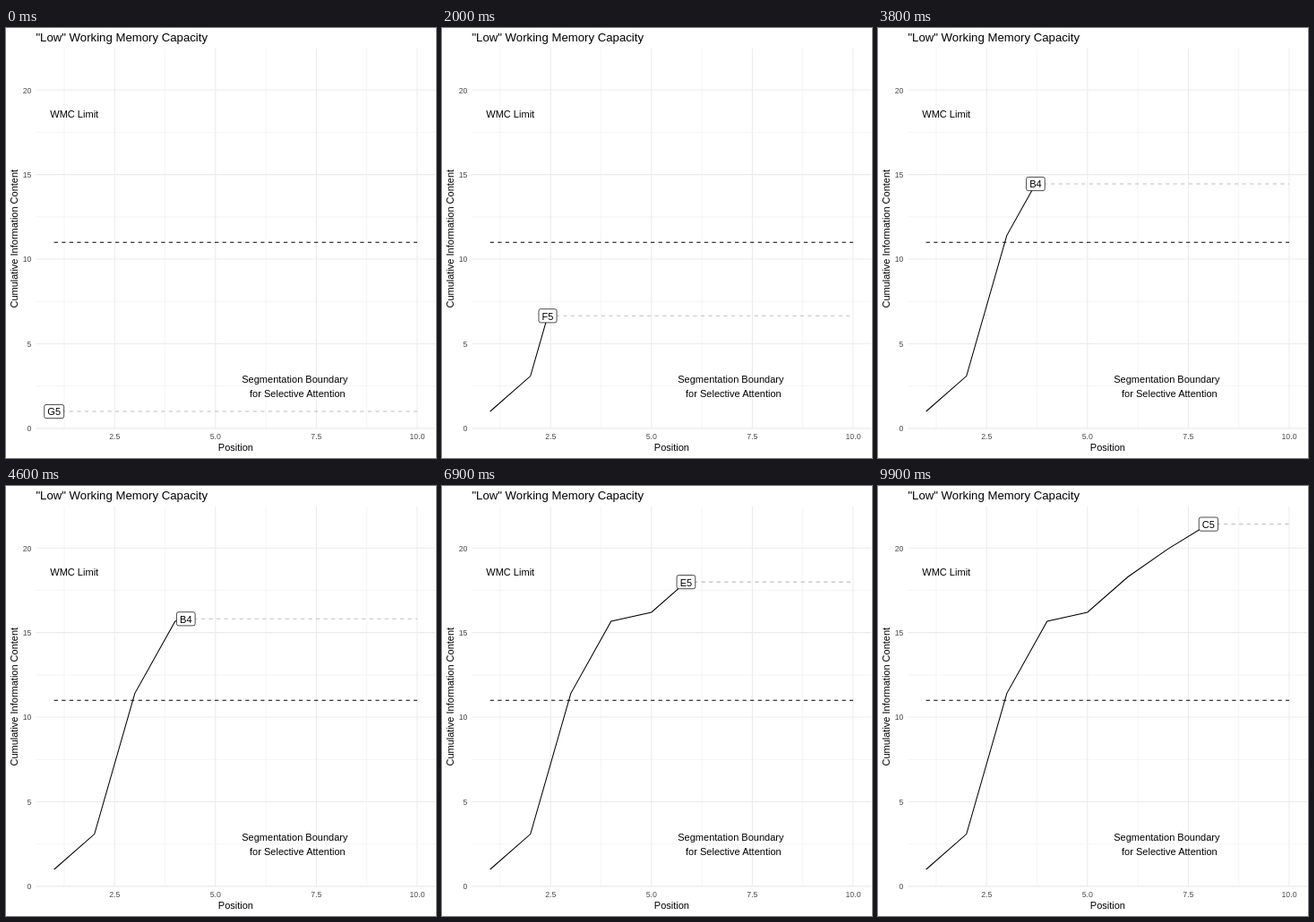
Animation, 480 px wide and 480 px high, one loop 10 s. Source, as an HTML page:

```html
<!DOCTYPE html>
<html lang="en">
<head>
<meta charset="utf-8">
<title>Working memory chart</title>
<style>
  html, body { margin: 0; width: 100%; height: 100%; overflow: hidden; background: #fff; }
  svg { display: block; width: 480px; height: 480px; font: 11.04px "Liberation Sans", Arial, sans-serif; }
  .line { fill: none; stroke: #000; stroke-width: 1.07; }
  .dash { stroke-dasharray: 4.27; }
  .tick { font-size: 8.8px; fill: #4d4d4d; }
  .axis { font-size: 11px; }
  .mid { text-anchor: middle; }
  .end { text-anchor: end; }
</style>
</head>
<body>
<svg id="chart" viewBox="0 0 480 480"></svg>
<script>
const chart = document.getElementById('chart');
const X = v => 53.7 + 45.03 * (v - 1);
const Y = v => 446.9 - 18.885 * v;

function add(tag, attrs, text = '') {
  const el = document.createElementNS('http://www.w3.org/2000/svg', tag);
  set(el, attrs);
  el.textContent = text;
  chart.append(el);
  return el;
}
function set(el, attrs) {
  for (const k in attrs) el.setAttribute(k, attrs[k]);
}
const label = (x, y, text, cls = 'mid') => add('text', { x, y, class: cls }, text);

// Grid: thin minor lines first, then major ones
const [left, right, top_, bottom] = [X(0.55), X(10.45), 23, 447.3];
const grid = (d, width) => add('path', { d, stroke: '#ebebeb', 'stroke-width': width });
const hLine = v => `M${left} ${Y(v)}H${right}`;
const vLine = v => `M${X(v)} ${top_}V${bottom}`;
const yTicks = [0, 5, 10, 15, 20], xTicks = [2.5, 5, 7.5, 10];
grid([2.5, 7.5, 12.5, 17.5].map(hLine).join('') + [1.25, 3.75, 6.25, 8.75].map(vLine).join(''), 0.53);
grid(yTicks.map(hLine).join('') + xTicks.map(vLine).join(''), 1.07);

for (const v of yTicks) label(28.5, Y(v) + 3.4, v, 'tick end');
for (const v of xTicks) label(X(v), 459.2, v.toFixed(1), 'tick mid');
label(256.4, 472, 'Position', 'axis mid');
set(label(0, 0, 'Cumulative Information Content', 'axis mid'), { transform: 'translate(13.4 235.2) rotate(-90)' });
set(label(33.4, 15, '"Low" Working Memory Capacity', ''), { 'font-size': 13.2 });

// Moving parts
const notes = ['G5', 'F5', 'A4', 'B4', 'C5', 'E5', 'D5', 'C5'];
const values = [1, 3.09, 11.4, 15.67, 16.2, 18.29, 19.95, 21.41];
const FRAMES = 100, STEP = 100;
const keys = notes.map((_, i) => Math.round(i * (FRAMES - 1) / 7));

const level = add('path', { class: 'line dash', style: 'stroke:#bebebe' });
const curve = add('path', { class: 'line' });
add('path', { class: 'line dash', d: `M${X(1)} ${Y(11)}H${X(10)}` });
label(X(1.5), 100.4, 'WMC Limit');
label(X(7) - 1.5, 396.3, 'Segmentation Boundary');
label(X(7) + 1.5, 412.2, 'for Selective Attention');
const box = add('rect', { height: 15.2, rx: 2.16, fill: '#fff', stroke: '#000', 'stroke-width': 0.71 });
const note = label(0, 0, '');

function draw(now) {
  const frame = Math.floor(now / STEP) % FRAMES;
  let i = 0;
  while (i < 6 && frame >= keys[i + 1]) i++;
  const part = (frame - keys[i]) / (keys[i + 1] - keys[i]);
  const x = X(i + 1 + part);
  const y = Y(values[i] + part * (values[i + 1] - values[i]));

  const points = values.slice(0, i + 1).map((v, k) => `${X(k + 1)} ${Y(v)}`);
  set(curve, { d: `M${points.join('L')}L${x} ${y}` });
  set(level, { d: `M${x} ${y}H${X(10)}` });

  note.textContent = notes[part < 0.5 ? i : i + 1];
  set(note, { x, y: y + 4.4 });
  const width = note.getComputedTextLength() + 7.2;
  set(box, { x: x - width / 2, y: y - 7.6, width });
}

const start = performance.now();
function tick() {
  draw(performance.now() - start);
  requestAnimationFrame(tick);
}
tick();
</script>
</body>
</html>
```
